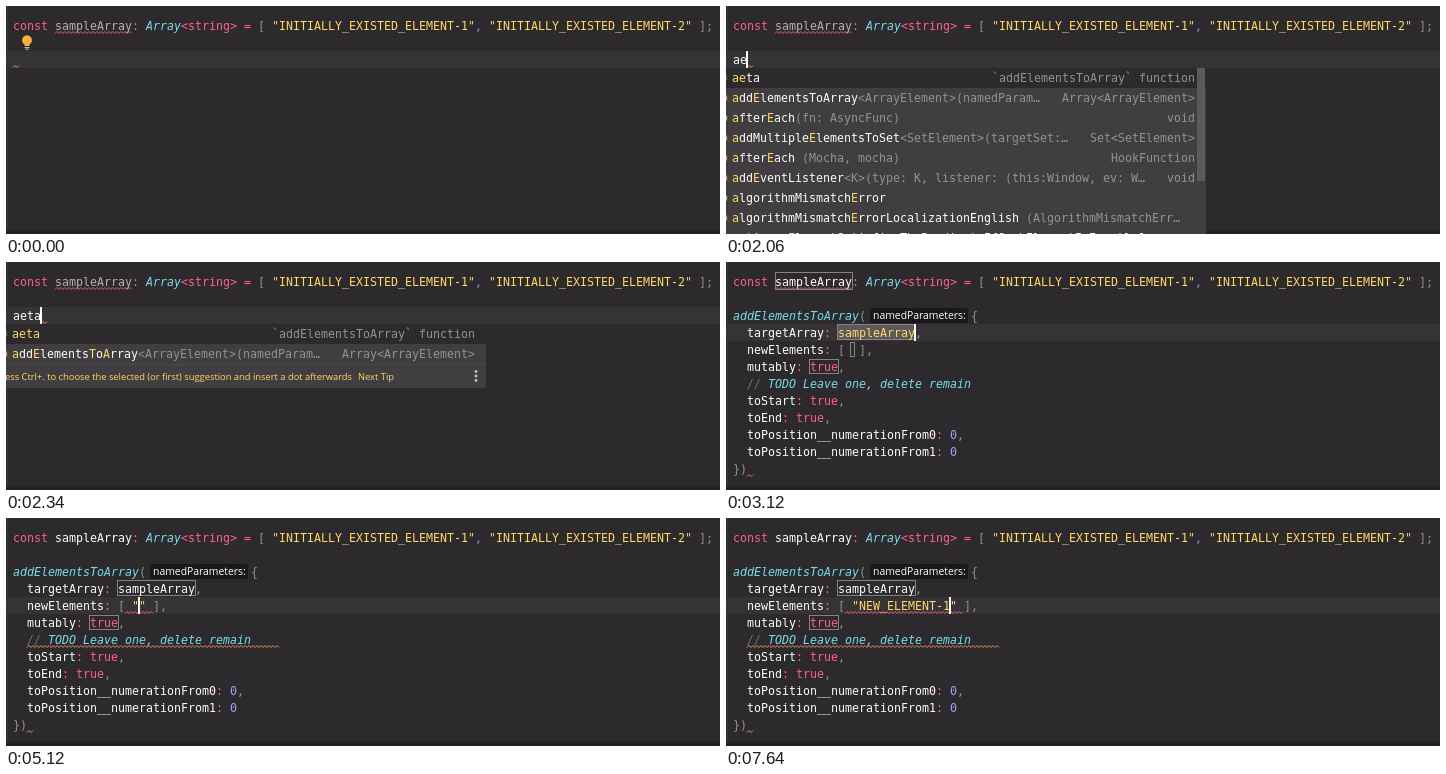
Write an HTML page that moves like this. It is 714 px wide and 228 px high and loops after 8000 ms.

```html
<!DOCTYPE html>
<html lang="en">
<head>
<meta charset="utf-8">
<title>Live template in a code editor</title>
<style>
  html, body { margin: 0; width: 714px; height: 228px; overflow: hidden; background: #2d2a2e; }
  svg { display: block; }
  text { font: 11.63px "DejaVu Sans Mono", monospace; white-space: pre; }
  .ui { font: 9.35px "Open Sans", sans-serif; fill: #ffd866; }
  .hint { font: 10.4px "Open Sans", sans-serif; fill: #fcfcfa; }
  .k { fill: #ff6188; }
  .w { fill: #fcfcfa; }
  .y { fill: #ffd866; }
  .g { fill: #939293; }
  .u { fill: #b3b1b3; }
  .p { fill: #ab9df2; }
  .b { fill: #78dce8; font-style: italic; }
  .c { fill: #727072; font-style: italic; }
</style>
</head>
<body>
<svg id="stage" width="714" height="228" viewBox="0 0 714 228"></svg>
<script>
const LOOP = 8000, CHAR = 7, LEFT = 7;
const RED = '#ff6188', ORANGE = '#fc9867', PANEL = '#403e41';
const stage = document.getElementById('stage');

const rowTop = row => 11 + 17 * row;
const colX = col => LEFT + CHAR * col;
const esc = s => s.replace(/&/g, '&amp;').replace(/</g, '&lt;');
const rect = (x, y, w, h, fill, extra = '') =>
  `<rect x="${x}" y="${y}" width="${w}" height="${h}" fill="${fill}" ${extra}/>`;
const outline = (x, y, w, h) =>
  rect(x + .5, y + .5, w - 1, h - 1, 'none', 'stroke="#848285"');

// parts alternate: class, text, class, text ...
function spans(x, y, parts) {
  let out = '';
  for (let i = 0; i < parts.length; i += 2) {
    out += `<tspan x="${x}" class="${parts[i]}">${esc(parts[i + 1])}</tspan>`;
    x += CHAR * parts[i + 1].length;
  }
  return `<text y="${y}">${out}</text>`;
}
const code = (row, col, ...parts) => spans(colX(col), rowTop(row) + 13, parts);
const caret = (row, col) => rect(colX(col) - 1, rowTop(row), 2, 17, '#fcfcfa');

function wave(x1, x2, row, color) {
  let d = `M${x1} ${rowTop(row) + 16.5}`;
  for (let x = x1, up = true; x + 2 <= x2; x += 2, up = !up) d += `l2 ${up ? -2 : 2}`;
  return `<path d="${d}" fill="none" stroke="${color}" stroke-width=".9"/>`;
}

// Typing schedule: [time, number of characters present]
const prefix = [[1890, 1], [2060, 2], [2130, 3], [2270, 4]];
const element = [[5860, 1], [5930, 2], [6070, 3], [6250, 4]];
for (let i = 0; i < 7; i++) element.push([Math.floor(6480 + i * 560 / 6), 5 + i]);
element.push([7510, 12], [7640, 13]);
const typed = (text, steps, t) =>
  text.slice(0, steps.reduce((n, [at, count]) => t >= at ? count : n, 0));

const items = [
  ['aeta', '', '`addElementsToArray` function', '#727072'],
  ['addElementsToArray', '<ArrayElement>(namedParam…', 'Array<ArrayElement>', ORANGE],
  ['afterEach', '(fn: AsyncFunc)', 'void', '#a9dc76'],
  ['addMultipleElementsToSet', '<SetElement>(targetSet:…', 'Set<SetElement>', ORANGE],
  ['afterEach', ' (Mocha, mocha)', 'HookFunction', ORANGE],
  ['addEventListener', '<K>(type: K, listener: (this:Window, ev: W…', 'void', ORANGE],
  ['algorithmMismatchError', '', '', '#a9dc76'],
  ['algorithmMismatchErrorLocalizationEnglish', ' (AlgorithmMismatchErr…', '', ORANGE],
  ['getArrayElementSatisfiesThePredicateIfSuchElementIsExactlyOne', '', '', ORANGE]
];

function matched(name, query) {
  const parts = [];
  let j = 0;
  [...name].forEach((ch, i) => {
    const hit = ch.toLowerCase() === query[j] && (i === j || /[A-Z]/.test(ch));
    if (hit) j++;
    parts.push(hit ? 'y' : 'w', ch);
  });
  return parts;
}

function popup(t, query) {
  const full = t < 2200, tip = t >= 2340;
  const list = full ? items : items.slice(0, 2);
  let out = rect(0, 62, 480, full ? 166 : tip ? 64 : 40, PANEL) + rect(0, 62, 480, 20, '#2d2a2e');
  list.forEach(([name, args, type, color], i) => {
    const y = 76 + 20 * i;
    out += `<circle cx="-2.5" cy="${y - 4}" r="3.5" fill="none" stroke="${color}"/>`;
    out += spans(6, y, [...matched(name, query), 'g', args]);
    out += spans(469 - CHAR * type.length, y, ['g', type]);
  });
  if (full) out += rect(471, 62, 8, 113, '#5b595c');
  if (tip) {
    out += rect(0, 102, 480, 1, '#4a484b');
    out += '<text class="ui" x="-1" y="118">ess Ctrl+. to choose the selected (or first) suggestion and insert a dot afterwards</text>';
    out += '<text class="ui" x="352" y="118">Next Tip</text>';
    for (const y of [109.5, 114, 118.5]) out += `<circle cx="470" cy="${y}" r="1.4" fill="#c1c0c0"/>`;
  }
  return out;
}

const bulb = () =>
  '<path d="M18.5 40v-1.5a5 5 0 1 1 5 0V40z" fill="#f4af3d"/>' + rect(18.5, 41, 5, 1.2, '#b9b7ba') + rect(19.5, 42.8, 3, 1, '#b9b7ba');

function declaration(t) {
  const used = t >= 3120;
  return code(0, 0, 'k', 'const ', used ? 'w' : 'u', 'sampleArray', 'k', ': ', 'b', 'Array',
      'k', '<string> = ', 'g', '[ ', 'y', '"INITIALLY_EXISTED_ELEMENT-1"', 'g', ', ',
      'y', '"INITIALLY_EXISTED_ELEMENT-2"', 'g', ' ];') +
    (t < 3480 ? wave(49, 126, 0, RED) : '') +
    (t >= 2740 && t < 4410 ? outline(49, 10, 78, 18) : '');
}

function prompt(t) {
  if (t >= 2670) return code(2, 0, 'w', 'addElementsToArray') + caret(2, 18);
  const text = typed('aeta', prefix, t), n = text.length;
  return code(2, 0, 'w', text) +
    wave(colX(n), colX(n) + 6, 2, ORANGE) +
    (t >= 720 ? caret(2, n) : bulb()) +
    (t >= 2060 ? popup(t, text) : '');
}

function template(t) {
  const parsed = t >= 3120, checked = t >= 3480, inList = t >= 4280, quoted = t >= 5120;
  const word = typed('NEW_ELEMENT-1', element, t);
  const value = quoted ? `"${word}"` : '';
  const prop = (row, name, cls, val, tail = ',') =>
    code(row, 2, 'w', name, 'k', ': ', cls, val, 'g', tail);
  let out = '';

  out += code(2, 0, parsed ? 'b' : 'w', 'addElementsToArray', 'g', '(');
  if (parsed) {
    out += rect(144, 46, 98, 15, '#19181a', 'rx="3"');
    out += '<text class="hint" x="147" y="57">namedParameters:</text>';
  }
  out += spans(parsed ? 245 : 140, 58, ['g', '{']);

  if (!inList) out += rect(112, 63, 77, 15, '#5b595c');
  out += outline(111, 62, 79, 16);
  out += prop(3, 'targetArray', t < 3290 ? 'y' : 'w', 'sampleArray');

  out += code(4, 2, 'w', 'newElements', 'k', ': ', 'g', '[ ', 'y', value, 'g', ' ],');
  if (!quoted) out += outline(124, 80, 5, 15);
  if (t >= 4410) out += wave(119, 133 + CHAR * value.length, 4, RED);

  out += outline(83, 97, 30, 15) + prop(5, 'mutably', 'k', 'true');
  out += code(6, 2, 'c', '// ', parsed ? 'b' : 'c', 'TODO Leave one, delete remain');
  if (checked) out += wave(21, 273, 6, ORANGE);
  out += prop(7, 'toStart', 'k', 'true') + prop(8, 'toEnd', 'k', 'true');
  out += prop(9, 'toPosition__numerationFrom0', 'p', '0');
  out += prop(10, 'toPosition__numerationFrom1', 'p', '0', '');
  out += code(11, 0, 'g', '})') + wave(21, 27, 11, checked ? ORANGE : RED);

  return out + (inList ? caret(4, 17 + (quoted ? 1 + word.length : 0)) : caret(3, 26));
}

function scene(t) {
  const active = t < 2740 ? 2 : t < 4280 ? 3 : 4;
  return rect(0, 0, 714, 228, '#2d2a2e') +
    rect(0, rowTop(active), 714, 17, '#363337') +
    rect(1, 0, 1, 224, '#373438') +
    rect(0, 224, 714, 4, '#252226') +
    declaration(t) + (t < 2740 ? prompt(t) : template(t));
}

let shown = '';
const start = performance.now();
function tick() {
  const next = scene((performance.now() - start) % LOOP);
  if (next !== shown) stage.innerHTML = shown = next;
  requestAnimationFrame(tick);
}
tick();
</script>
</body>
</html>
```
